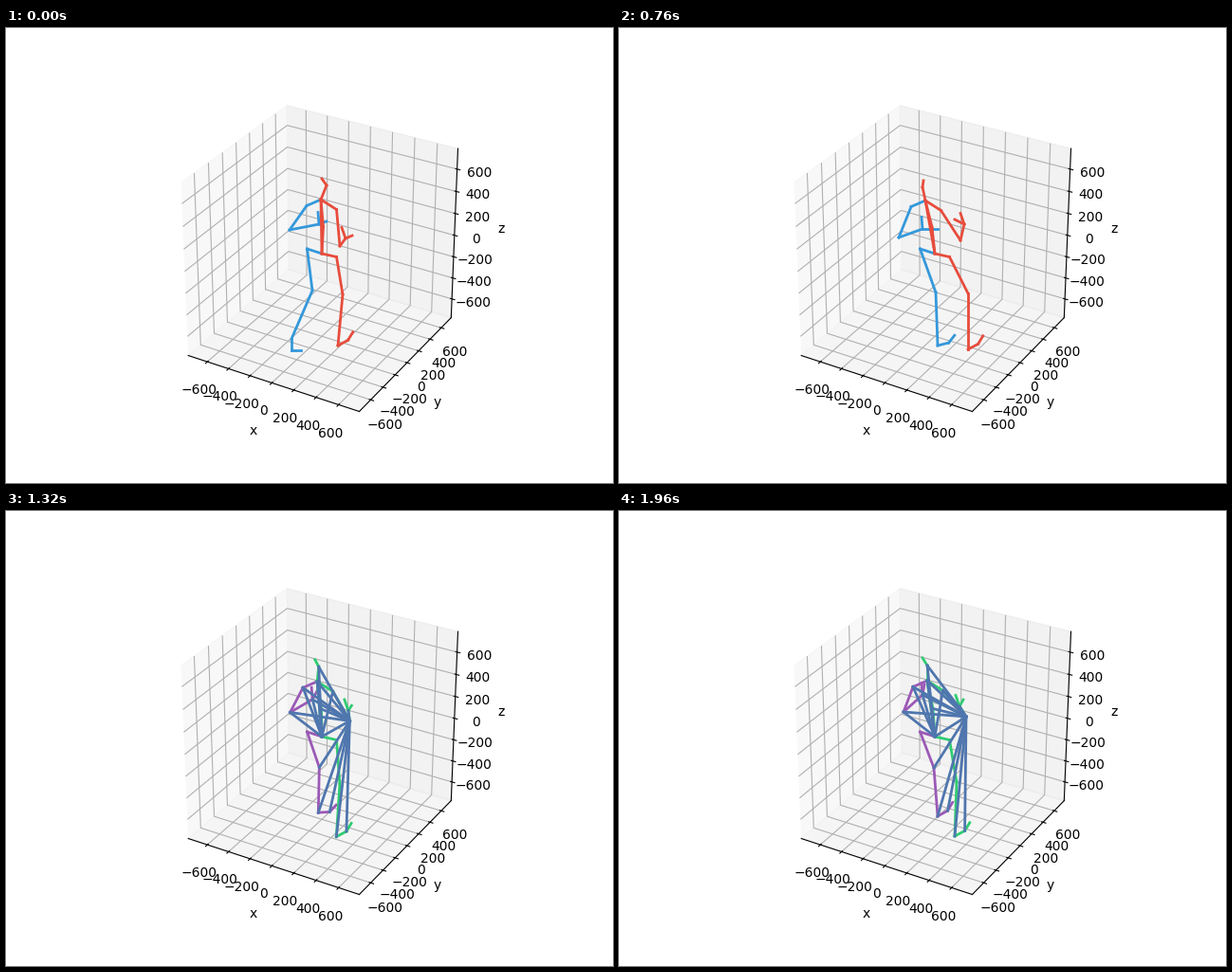
A matplotlib script that plays this animation: 640 px wide and 480 px high, repeating every 2 s.

```python
import numpy as np
import matplotlib.pyplot as plt
from matplotlib.animation import FuncAnimation
from matplotlib.collections import LineCollection

FRAMES, HALF, INTERVAL = 50, 25, 40
W, H = 640, 480
RADIUS = 750

BLUE, RED = "#3498db", "#e74c3c"
PURPLE, GREEN = "#9b59b6", "#2ecc71"
LINK = "#4f76ae"

PELVIS = np.array([333, 238])

# Stage position of each driven joint: at the start, and where it
# settles in the recorded and in the predicted motion.
JOINTS = {
    "neck": [(332, 181), (323, 182), (325, 179)],
    "head": [(338, 166), (320, 168), (325, 163)],
    "top": [(333, 159), (321, 161), (320, 155)],
    "re": [(352, 230), (360, 224), (366, 217)],
    "rw": [(358, 222), (364, 207), (359, 206)],
    "rh": [(365, 219), (354, 202), (363, 199)],
    "le": [(299, 213), (295, 221), (300, 212)],
    "lw": [(330, 207), (320, 212), (320, 194)],
    "lh": [(338, 204), (336, 212), (322, 183)],
    "rk": [(355, 281), (368, 280), (356, 286)],
    "ra": [(350, 335), (368, 339), (354, 343)],
    "lk": [(323, 277), (334, 279), (332, 271)],
    "la": [(301, 328), (336, 335), (336, 322)],
}
# Detour on the way: the left leg swings while the right one pushes back.
SWAY = {"head": (-4, 0), "re": (10, -5), "rw": (9, -10), "rh": (2, -10),
        "lw": (-5, -4), "lh": (-3, -12), "rk": (-14, 16), "ra": (-15, 16),
        "lk": (9, -12), "la": (34, -25)}
PITCH = [-90, 14, 29]  # left foot, in degrees
PITCH_SWAY = 106


def glide(keys, sway, half, u):
    """Ease out from the start to the settled place, bowed by sway."""
    a, b = np.array(keys[0]), np.array(keys[1 + half])
    bow = np.array(sway) * (0.3 if half else 1) * np.sin(np.pi * u)
    return a + (b - a) * (1 - (1 - u) ** 2) + bow


def polar(length, degrees):
    t = np.radians(degrees)
    return length * np.array([np.cos(t), -np.sin(t)])


def pose(i):
    half = i // HALF
    u = min((i % HALF) / (24 if half else 19), 1)
    p = {n: glide(k, SWAY.get(n, (0, 0)), half, u)
         for n, k in JOINTS.items()}
    p["pel"] = PELVIS
    p["rhip"], p["lhip"] = PELVIS + (15.5, 3.5), PELVIS - (15.5, 5)
    p["mid"] = (PELVIS + p["neck"]) / 2 + (2, 0)
    p["rs"], p["ls"] = p["neck"] + (16.5, 10.5), p["neck"] + (-15, 6.5)
    p["rt"], p["lt"] = p["rw"] + (-4, -11.5), p["lw"] + (-1, -12.5)
    for side, pitch in (("r", 28), ("l", glide(PITCH, PITCH_SWAY, half, u))):
        p[side + "b"] = p[side + "a"] + polar(12, pitch)
        p[side + "tip"] = p[side + "b"] + polar(10, 45 + pitch / 2)
    return p


def chains(text):
    """Turn 'a-b-c d-e' into the pairs along each chain."""
    return [pair for c in text.split()
            for pair in zip(c.split("-"), c.split("-")[1:])]


def star(hub, ends):
    return [(hub, e) for e in ends.split()]


RIGHT = chains("pel-mid-neck-head-top pel-neck neck-rs-re-rw-rh rw-rt "
               "pel-rhip-rk-ra-rb-rtip")
LEFT = chains("neck-ls-le-lw-lh lw-lt pel-lhip-lk-la-lb-ltip")

# Learned links gather around two hubs, which change once.
EARLY = (star("neck", "head ls rs le lk ra rb rw re lhip mid")
         + star("lk", "le ls ra rw mid head rs re")
         + chains("lb-rw ls-lhip"))
LATE = (star("re", "head neck ls le lw mid rs rw pel lk la lb ra rb")
        + star("pel", "head neck ls rs le lw"))
SWITCH = 29

fig = plt.figure(figsize=(W / 100, H / 100), dpi=100)
ax = fig.add_subplot(projection="3d")
ax.view_init(elev=30, azim=-60)
ax.set_box_aspect((1, 1, 1), zoom=np.sqrt(3) / 1.8294640721620434)
lim = RADIUS * 25 / 24
ticks = range(-600, 601, 200)
ax.set(xlim=(-lim, lim), ylim=(-lim, lim), zlim=(-lim, lim),
       xticks=ticks, yticks=ticks, zticks=ticks,
       xlabel="x", ylabel="y", zlabel="z")

# Flat layer in stage pixels for the figure.
flat = fig.add_axes([0, 0, 1, 1], zorder=5)
flat.set(xlim=(0, W), ylim=(H, 0))
flat.axis("off")


def lines(z):
    return flat.add_collection(
        LineCollection([], linewidths=2, capstyle="projecting", zorder=z),
        autolim=False)


left, right, links = lines(2), lines(3), lines(4)


def draw(i):
    first = i < HALF
    p = pose(i)
    extra = [] if first else EARLY if i < SWITCH else LATE
    for art, edges, color in ((left, LEFT, BLUE if first else PURPLE),
                              (right, RIGHT, RED if first else GREEN),
                              (links, extra, LINK)):
        art.set_segments([(p[a], p[b]) for a, b in edges])
        art.set_color(color)
    return left, right, links


anim = FuncAnimation(fig, draw, frames=FRAMES, interval=INTERVAL,
                     repeat=True, repeat_delay=0, blit=False)
plt.show()
```
